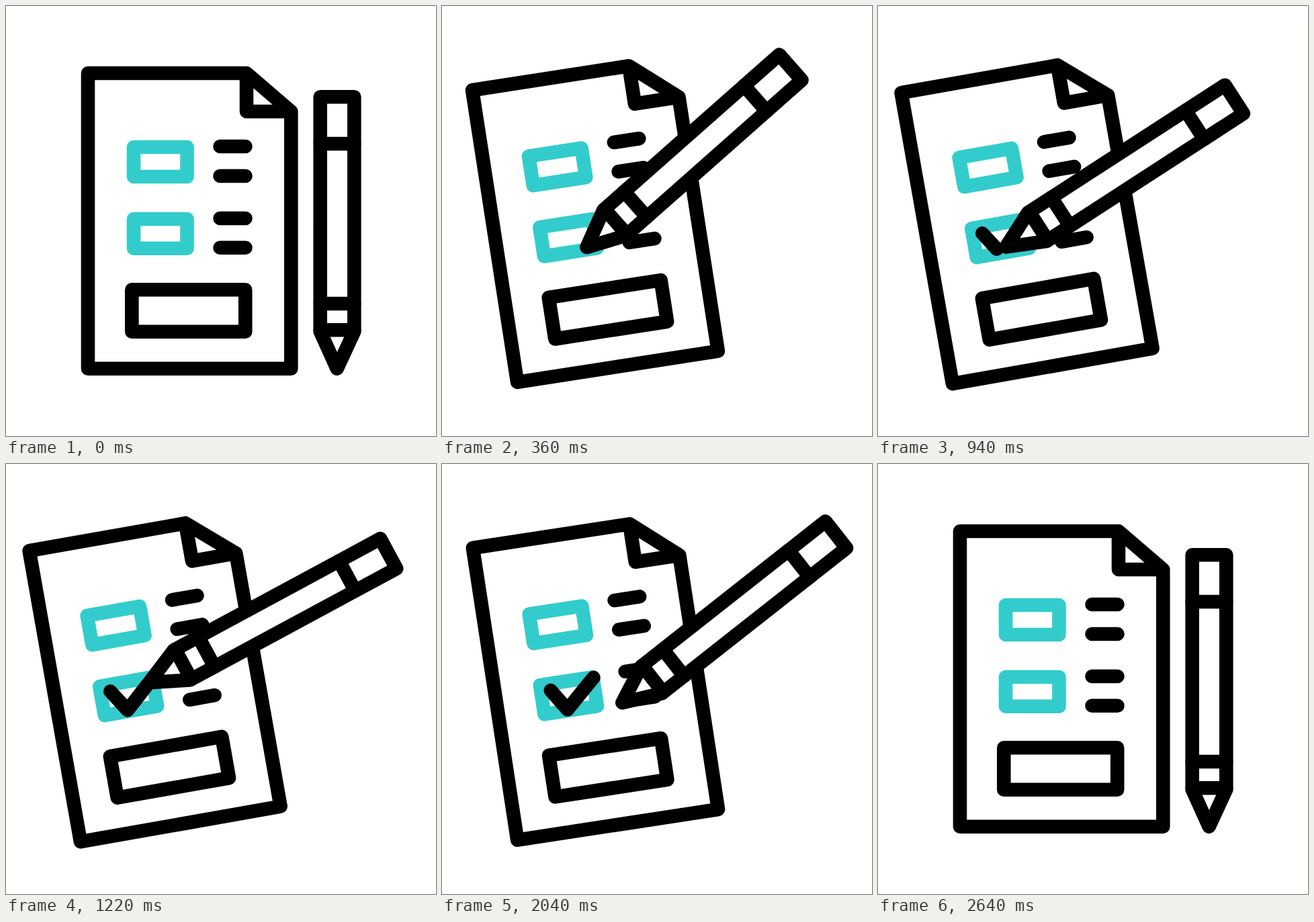
Recreate the animation shown at these times as an HTML page. Size 640 by 640 pixels, loop 2820 ms.

```html
<!DOCTYPE html>
<html lang="en">
<head>
<meta charset="utf-8">
<title>Checklist and pencil</title>
<style>
  html, body { margin: 0; height: 100%; overflow: hidden; background: #fff; }
  svg { display: block; width: 100vw; height: 100vh; }
  path { stroke: #000; stroke-width: 20.6; stroke-linecap: round; stroke-linejoin: round; fill: none; }
  .box { stroke: #3cc; }
  .solid { fill: #fff; }
</style>
</head>
<body>
<svg viewBox="0 0 640 640">
  <g id="paper">
    <path class="solid" d="M122 100H358L424.3 157V539.7H122ZM358 100V157H424.3"/>
    <path class="box" d="M190 210H269.5V254H190ZM190 317H269.5V360.7H190Z"/>
    <path d="M318.5 209H356.5M318.5 253H356.5M318.5 316H356.5M318.5 359.7H356.5"/>
    <path d="M187.3 422.3H356.2V484.7H187.3Z"/>
    <path id="check" pathLength="1" d="M204.5 327L225 359L271.4 317"/>
  </g>
  <g id="pencil">
    <path class="solid" d="M467.7 135.2H518.3V484.5L492.7 539.7L467.7 484.5Z"/>
    <path d="M467.7 205H518.3M467.7 443H518.3M467.7 482.3H518.3"/>
  </g>
</svg>
<script>
const LOOP = 2820;
const [paper, check, pencil] = ['paper', 'check', 'pencil'].map(id => document.getElementById(id));

// Progress from start to end, eased by cubic-bezier(x1, 0, x2, 1)
function ease(time, start, end, x1, x2) {
  const x = Math.min(1, Math.max(0, (time - start) / (end - start)));
  if (x === 0 || x === 1) return x;
  let low = 0, high = 1;
  for (let i = 0; i < 24; i++) {
    const s = (low + high) / 2, r = 1 - s;
    if (3 * s * r * r * x1 + 3 * s * s * r * x2 + s * s * s < x) low = s;
    else high = s;
  }
  return low * low * (3 - 2 * low);
}

const mix = (from, to, p) => from.map((v, i) => v + (to[i] - v) * p);

// Pencil poses: tip x, tip y, angle
const REST = [492.7, 540, 0];
const ABOVE = [176.5, 334, 55.3];
const CORNER = [184, 368, 55.8];
const FINISH = [219.5, 315.5, 63];

function draw(time) {
  const arrive = ease(time, 0, 680, .3, .05);

  const tilt = arrive * (1 - ease(time, 1720, 2640, .67, .53));
  paper.setAttribute('transform',
    `translate(${-51.5 * tilt} ${-.4 * tilt}) rotate(${-10 * tilt} 273 320)`);

  let pose = mix(REST, ABOVE, arrive);
  pose = mix(pose, CORNER, ease(time, 600, 840, .33, .67));
  pose = mix(pose, FINISH, ease(time, 820, 1560, .23, .29));
  const [x, y, angle] = mix(pose, REST, ease(time, 1560, 2640, .76, .62));
  pencil.setAttribute('transform',
    `translate(${x} ${y}) rotate(${angle}) translate(${-REST[0]} ${-REST[1]})`);

  const drawn = ease(time, 640, 1530, .44, .35) * (1 - ease(time, 2000, 2640, .33, .67));
  check.style.display = drawn > 0 ? '' : 'none';
  check.setAttribute('stroke-dasharray', drawn < 1 ? `${drawn} 2` : 'none');
}

function tick() {
  draw(performance.now() % LOOP);
  requestAnimationFrame(tick);
}
tick();
</script>
</body>
</html>
```
